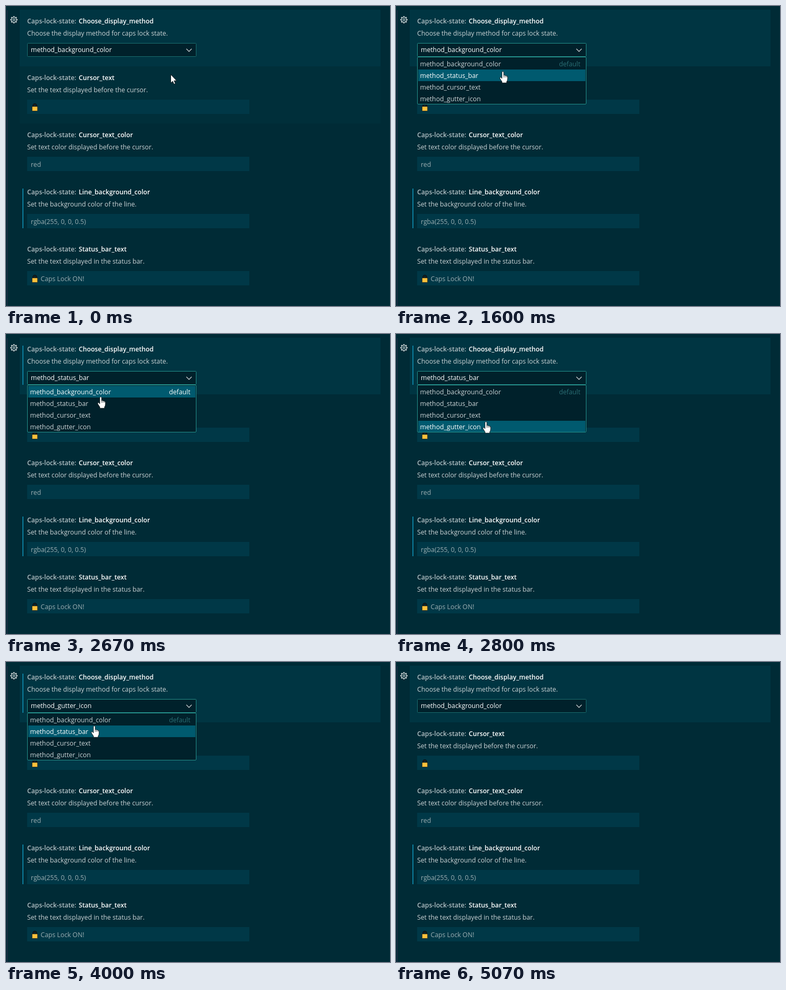
These frames come from a looping animation (726 px wide and 567 px high, 5140 ms). An HTML page:

```html
<!DOCTYPE html>
<html lang="en">
<head>
<meta charset="utf-8">
<title>Settings</title>
<style>
  html, body { margin: 0; width: 100%; height: 100%; overflow: hidden; background: #002b36; }
  svg { display: block; }
  text { font: 12.27px "Open Sans", "Noto Sans", sans-serif; fill: #ccd4d6; white-space: pre; }
  .category, .key { font-size: 12.2px; font-weight: 600; }
  .category { fill: #b2bfc3; }
  .key { fill: #fff; }
  .input { fill: #9caeb2; }
  .value, .on { fill: #fff; }
  .hint { fill: #2b7076; text-anchor: end; }
  .hint.on { fill: #fff; }
</style>
</head>
<body>
<svg width="726" height="567" viewBox="0 0 726 567">
  <defs>
    <g id="lock" fill="none">
      <path d="M2.6 6V3.6a2.9 2.9 0 0 1 5.8 0V6" stroke="#000" stroke-width="2.8"/>
      <path d="M2.6 6V3.6a2.9 2.9 0 0 1 5.8 0V6" stroke="#4a5358" stroke-width=".7"/>
      <rect x=".3" y="4.9" width="10.4" height="8.6" rx="1" fill="#ffc03c" stroke="#15150c" stroke-width=".7"/>
    </g>
  </defs>
  <path d="M2.5 8V567" stroke="#2b2b4a"/>
  <rect x="26" y="7" width="682" height="107" fill="#003542"/>
  <rect id="hover" x="26" width="682" height="108" fill="#002f3a"/>
  <rect id="outline" x="26.5" y="7.5" width="681" height="106" fill="none" stroke="#1c7875"/>
  <g fill="none" stroke="#d4dadb" transform="translate(15 26)">
    <circle r="4.8" stroke-width="1.2"/>
    <circle r="6.1" stroke-width="1.7" pathLength="16" stroke-dasharray="1" stroke-dashoffset=".5"/>
    <circle r="1.9" stroke-width="1.1"/>
  </g>
  <g id="rows"></g>
  <g fill="#0c7d9d">
    <rect id="modified" x="31" y="22" width="2" height="74"/>
    <rect x="31" y="345" width="2" height="75"/>
  </g>
  <rect id="select" x="40.5" y="70.5" width="319" height="25" rx="1" fill="#00212b"/>
  <text id="value" class="value" x="47" y="87"></text>
  <path d="M341 80.8l5 5 5-5" fill="none" stroke="#e4e8e9" stroke-width="1.2"/>
  <g id="menu">
    <rect x="40" y="96" width="320" height="90" rx="2" fill="#00212b"/>
    <rect id="highlight" x="42" width="316" height="22" fill="#005a6f"/>
    <g id="items"></g>
    <rect x="40.5" y="96.5" width="319" height="89" rx="1.5" fill="none" stroke="#25908b"/>
  </g>
  <g id="cursor" fill="#fff" stroke="#061216" stroke-width=".9" stroke-linejoin="round">
    <path id="arrow" d="M.5.5V16.6L4.2 13.2 6.7 18.8 9.2 17.7 6.8 12.2H11.6Z"/>
    <g id="hand">
      <path d="M-1.8 2Q0-1 1.8 2V8Q3.6 6.8 4.3 8.6 6.3 7.5 7 9.5 9 8.8 9 11V15Q9 18 7.2 20V22.3H-1.7V20L-5.6 14Q-6.4 11.6-4 11.5L-1.8 13.8Z"/>
      <path d="M1.8 8V12M4.3 8.6V12M7 9.5V12" fill="none" stroke-width=".7"/>
    </g>
    <g id="busy" fill="none" stroke-width="3.4">
      <circle cx="13.5" cy="0" r="5.3" stroke="#1c86d8"/>
      <path d="M9.2 3.1A5.3 5.3 0 0 1 13.5-5.3" stroke="#48b4f4"/>
    </g>
  </g>
</svg>
<script>
const LOOP = 5140, STEP = 1000 / 15;
const $ = id => document.getElementById(id);
const text = (x, y, cls, s) => `<text x="${x}" y="${y}" class="${cls}">${s}</text>`;
const show = (id, on) => $(id).setAttribute('display', on ? 'inline' : 'none');

const settings = [
  { key: 'Choose_display_method', about: 'Choose the display method for caps lock state.' },
  { key: 'Cursor_text', about: 'Set the text displayed before the cursor.', input: '', lock: true },
  { key: 'Cursor_text_color', about: 'Set text color displayed before the cursor.', input: 'red' },
  { key: 'Line_background_color', about: 'Set the background color of the line.', input: 'rgba(255, 0, 0, 0.5)' },
  { key: 'Status_bar_text', about: 'Set the text displayed in the status bar.', input: 'Caps Lock ON!', lock: true },
];
const methods = ['background_color', 'status_bar', 'cursor_text', 'gutter_icon'].map(s => 'method_' + s);

$('rows').innerHTML = settings.map(({ key, about, input, lock }, i) => {
  const y = i ? 108 * i - 1 : 0;
  const field = i ? `<rect x="40" y="${y + 70}" width="420" height="27" fill="#003847"/>` +
    text(lock ? 65.5 : 47, y + 89, 'input', input) : '';
  return text(40, y + 33, 'category', 'Caps-lock-state:') + text(137.5, y + 33, 'key', key) +
    text(40, y + 56, '', about) + field +
    (lock ? `<use href="#lock" x="49" y="${y + 78}"/>` : '');
}).join('');
$('items').innerHTML = methods.map((m, i) => text(45.5, 114 + 22 * i, '', m)).join('') +
  text(348.5, 114, 'hint', 'default');
const items = [...$('items').children];

// each visit to the menu ends with a choice
const visits = [
  { open: 860, close: 2190, choice: 1 },
  { open: 2590, close: 3130, choice: 3 },
  { open: 3730, close: 4460, choice: 0 },
];

// where the pointer comes to rest
const stops = [
  { at: 0, x: 311, y: 129 },
  { at: 430, x: 146, y: 67 },
  { at: 733, x: 249, y: 86 },
  { at: 1667, x: 196, y: 128 },
  { at: 2333, x: 184, y: 90 },
  { at: 2867, x: 169, y: 171 },
  { at: 3333, x: 185, y: 98 },
  { at: 4000, x: 167, y: 120 },
  { at: 4467, x: 167, y: 116 },
  { at: 4533, x: 190, y: 397 },
];

// glides at 3 ms per pixel, slowing down towards each stop
function pointer(t) {
  const i = stops.findIndex(s => s.at > t);
  if (i < 0) return stops.at(-1);
  const a = stops[i - 1], b = stops[i];
  const start = Math.max(a.at, b.at - 3 * Math.hypot(b.x - a.x, b.y - a.y));
  const k = 1 - (1 - Math.max(0, (t - start) / (b.at - start))) ** 2;
  return { x: Math.round(a.x + (b.x - a.x) * k), y: Math.round(a.y + (b.y - a.y) * k) };
}

function draw(now) {
  // the screen refreshes 15 times a second
  const t = Math.round(Math.floor((now % LOOP + 3.4) / STEP) * STEP);
  const { x, y } = pointer(t);
  const visible = t < 4590;
  const open = visits.some(v => t >= v.open && t < v.close);
  const focused = t >= 590 && t < 5060;
  const current = visits.findLast(v => t >= v.close)?.choice ?? 0;
  const active = y < 100 ? current : Math.floor((y - 98) / 22);
  const row = Math.floor((y - 6) / 108);
  const pointing = open || (y >= 70 && y <= 96);

  $('hover').setAttribute('y', 6 + 108 * row);
  show('hover', visible && !open && row > 0);
  show('outline', focused && !open);
  show('modified', t >= 2260 && t < 4860);
  $('select').setAttribute('stroke', focused ? '#25908b' : '#1a6d6e');
  $('value').textContent = methods[current];

  show('menu', open);
  $('highlight').setAttribute('y', 98 + 22 * active);
  items.forEach((el, i) => el.classList.toggle('on', i % methods.length === active));

  $('cursor').setAttribute('transform', `translate(${x} ${y})`);
  show('cursor', visible);
  show('hand', pointing);
  show('arrow', !pointing);
  show('busy', t >= 3660 && t < 3730);
}

function tick() {
  draw(performance.now());
  requestAnimationFrame(tick);
}
tick();
</script>
</body>
</html>
```
